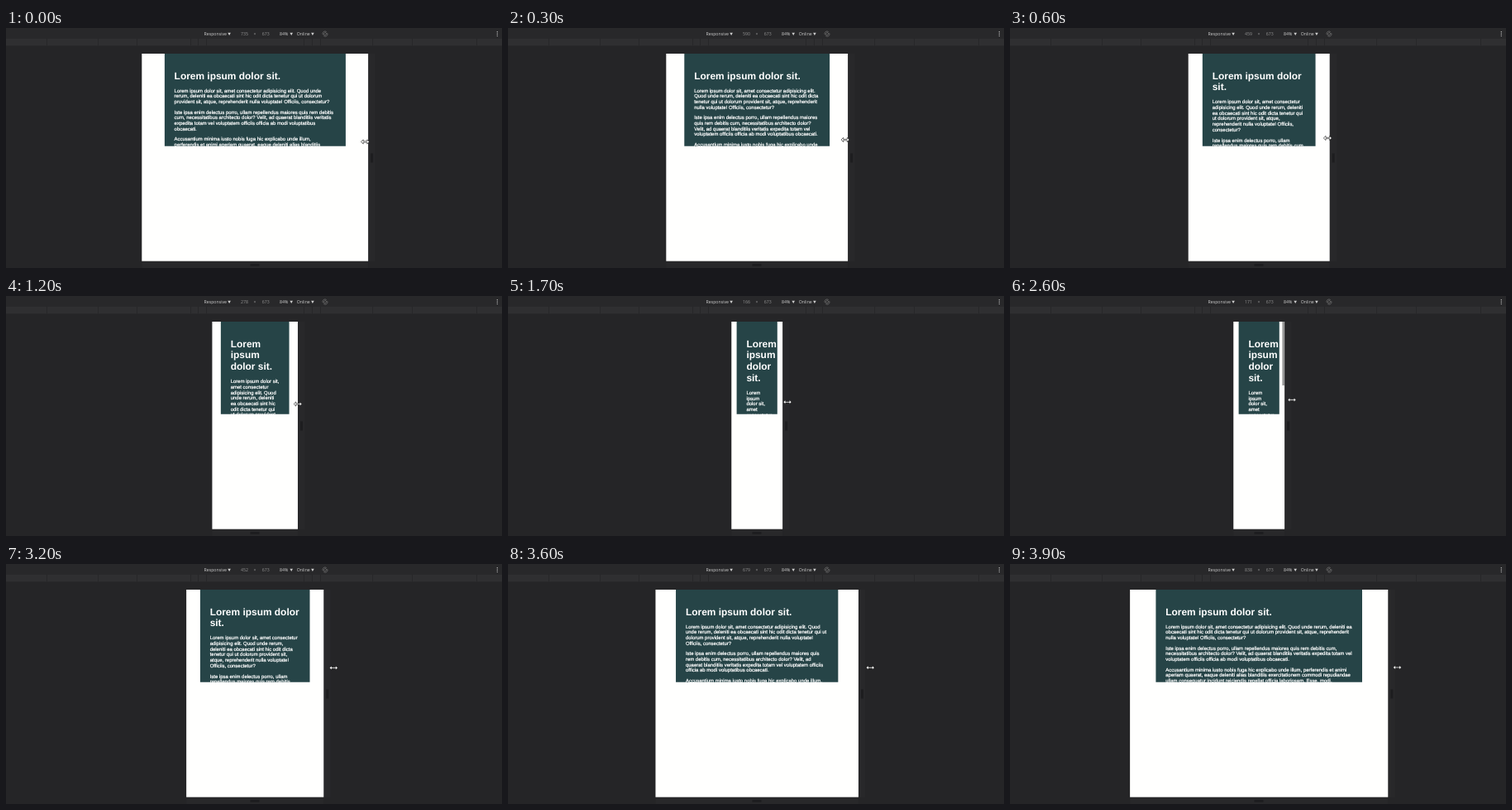
An HTML page that plays this animation: 600 by 290 pixels, repeating every 4000 ms.

```html
<!DOCTYPE html>
<html lang="en">
<head>
<meta charset="utf-8">
<title>Responsive resize</title>
<style>
  html, body { margin: 0; width: 100%; height: 100%; overflow: hidden; background: #252527; }
  #stage { position: relative; width: 600px; height: 290px; overflow: hidden; background: #252527; }
  svg { position: absolute; left: 0; top: 0; }
  svg text { font: 5.2px "Open Sans", "Noto Sans", sans-serif; fill: #cfcfcf; }
  svg .dim { fill: #929292; }
  #page {
    position: absolute; left: 0; top: 31px; height: 673px; overflow: hidden;
    background: #fffffe; transform-origin: 0 0;
    font: 16px/18px Arial, "Liberation Sans", sans-serif;
    text-rendering: geometricPrecision;
  }
  #card {
    box-sizing: border-box; width: 80%; height: 300px; margin: 0 auto; padding: 32px;
    overflow: hidden; background: #264447; color: #fff;
  }
  h1 { margin: 21.44px 0; font-size: 32px; line-height: 37px; }
  p { margin: 16px 0; -webkit-text-stroke: 0.6px #fff; }
  #bar { position: absolute; right: 1px; top: 0; width: 6px; height: 207px; background: #8b8b8b; }
</style>
</head>
<body>
<div id="stage">
  <svg width="600" height="290" viewBox="0 0 600 290">
    <rect width="600" height="13" fill="#28282a"/>
    <rect y="13" width="600" height="8.5" fill="#2f2f31"/>
    <g id="ticks" fill="#272729"></g>
    <text x="239.6" y="9.1">Responsive</text>
    <text x="284" y="9.1" class="dim" id="label"></text>
    <text x="299.5" y="9.1" class="dim">×</text>
    <text x="309.8" y="9.1" class="dim">673</text>
    <text x="331" y="9.1">84%</text>
    <text x="351.8" y="9.1">Online</text>
    <path d="M268.3 5.7h3.6l-1.8 3.2zM343.4 5.7h3.6l-1.8 3.2zM369.1 5.7h3.6l-1.8 3.2z" fill="#cfcfcf"/>
    <g fill="none" stroke="#808080" stroke-width=".6">
      <path d="M383.4 8.2a2.8 2.8 0 0 1 4.4-3.4M388.6 6a2.8 2.8 0 0 1-4.4 3.4"/>
      <rect x="384.6" y="5.8" width="2.8" height="2.6" transform="rotate(-40 386 7.1)"/>
    </g>
    <g fill="#bdbdbd">
      <circle cx="594.3" cy="4.8" r=".7"/><circle cx="594.3" cy="7.2" r=".7"/><circle cx="594.3" cy="9.6" r=".7"/>
    </g>
    <g id="side">
      <rect y="31" width="8.5" height="251" fill="#28282a"/>
      <rect x="3" y="151.5" width="3" height="11" fill="#1d1d1f"/>
    </g>
    <rect id="foot" y="281.7" height="8.3" fill="#28282a"/>
    <rect x="295.5" y="285" width="11" height="2.8" fill="#1d1d1f"/>
  </svg>
  <div id="page">
    <div id="card">
      <h1>Lorem ipsum dolor sit.</h1>
      <p>Lorem ipsum dolor sit, amet consectetur adipisicing elit. Quod unde rerum, deleniti ea obcaecati sint hic odit dicta tenetur qui ut dolorum provident sit, atque, reprehenderit nulla voluptate! Officiis, consectetur?</p>
      <p>Iste ipsa enim delectus porro, ullam repellendus maiores quis rem debitis cum, necessitatibus architecto dolor? Velit, ad quaerat blanditiis veritatis expedita totam vel voluptatem officiis officia ab modi voluptatibus obcaecati.</p>
      <p>Accusantium minima iusto nobis fuga hic explicabo unde illum, perferendis et animi aperiam quaerat, eaque deleniti alias blanditiis exercitationem commodi repudiandae ullam consequatur incidunt reiciendis repellat officia laboriosam. Esse, modi.</p>
    </div>
    <div id="bar"></div>
  </div>
  <svg width="600" height="290" viewBox="0 0 600 290">
    <path id="cursor" d="M-5 0l2.7-2.6v1.9h4.6v-1.9L5 0 2.3 2.6V.7h-4.6v1.9z" fill="#fff" stroke="#111" stroke-width=".6"/>
  </svg>
</div>
<script>
  const SCALE = 0.3725, CENTER = 301.2, LOOP = 4000, STEP = 100;

  // time, page width, shown width, cursor x, cursor y
  const KEYS = [
    [0, 735, 735, 434.5, 137.5],
    [600, 459, 459, 384.3, 133],
    [1200, 278, 278, 353, 130.5],
    [1700, 166, 166, 338, 128.2],
    [1800, 162, 162, 334, 127.6],
    [2100, 160, 160, 333.5, 126],
    [2300, 160, 160, 333.5, 126],
    [2600, 166, 171, 341, 125.5],
    [2900, 291, 302, 368, 125.5],
    [3200, 446, 452, 396.3, 125.5],
    [3500, 602, 624, 428, 125.3],
    [3900, 838, 838, 468.5, 125]
  ];

  const $ = id => document.getElementById(id);
  const page = $("page"), label = $("label"), side = $("side"),
        foot = $("foot"), cursor = $("cursor"), bar = $("bar");

  $("ticks").innerHTML = [49, 111, 158, 223, 232, 242, 360, 370, 380, 443, 491, 569]
    .map(x => `<rect x="${x}" y="13" width="1" height="8.5"/>`).join("");

  const slope = (i, c) => KEYS[i + 1]
    ? (KEYS[i + 1][c] - KEYS[i][c]) / (KEYS[i + 1][0] - KEYS[i][0]) : 0;

  // Monotone tangent: no overshoot at the pauses
  function tangent(i, c) {
    if (i === 0) return slope(0, c);
    if (i === KEYS.length - 1) return slope(i - 1, c);
    const a = slope(i - 1, c), b = slope(i, c);
    return a * b > 0 ? 2 * a * b / (a + b) : 0;
  }

  function valueAt(t, c) {
    let i = 0;
    while (i < KEYS.length - 2 && t >= KEYS[i + 1][0]) i++;
    const a = KEYS[i], b = KEYS[i + 1], d = b[0] - a[0];
    const u = Math.min(1, (t - a[0]) / d), v = 1 - u;
    return a[c] * (1 + 2 * u) * v * v + b[c] * u * u * (3 - 2 * u)
      + d * u * v * (tangent(i, c) * v - tangent(i + 1, c) * u);
  }

  function draw(t) {
    const width = Math.round(valueAt(t, 1)), w = width * SCALE;
    const left = CENTER - w / 2;
    page.style.width = width + "px";
    page.style.transform = `translateX(${left}px) scale(${SCALE})`;
    bar.style.display = t >= 2400 && t < 2800 ? "block" : "none";
    label.textContent = Math.round(valueAt(t, 2));
    side.setAttribute("transform", `translate(${left + w} 0)`);
    foot.setAttribute("x", left);
    foot.setAttribute("width", w);
    cursor.setAttribute("transform", `translate(${valueAt(t, 3)} ${valueAt(t, 4)})`);
  }

  const start = performance.now();
  function tick() {
    const t = (performance.now() - start) % LOOP;
    draw(Math.floor(t / STEP) * STEP);
    requestAnimationFrame(tick);
  }
  tick();
</script>
</body>
</html>
```
